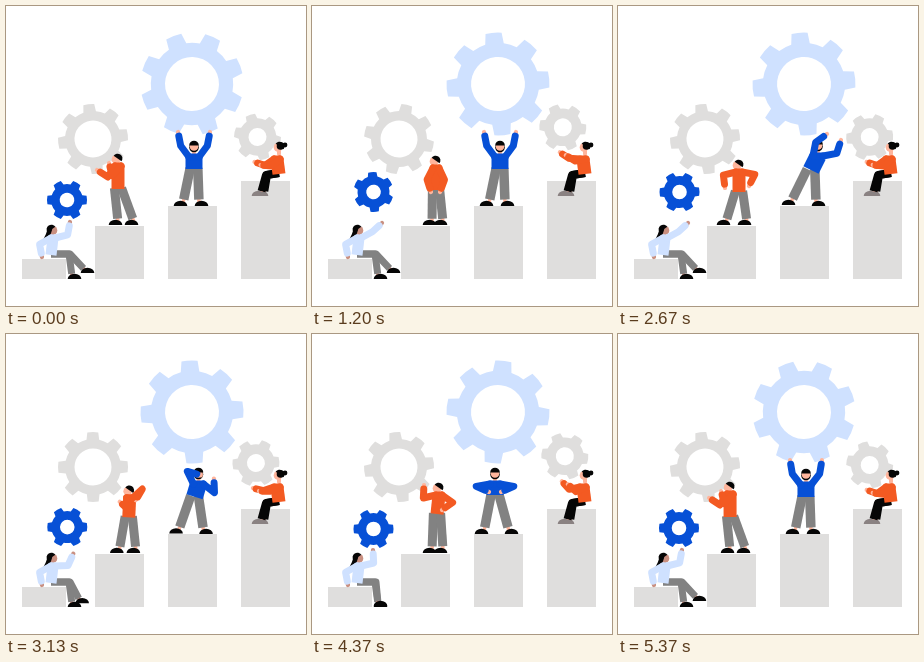
These frames come from a looping animation (300 px wide and 300 px high, 5.41 s). An HTML page with a canvas:

```html
<!DOCTYPE html>
<html lang="en">
<head>
<meta charset="utf-8">
<title>Gears</title>
<style>
  html, body { margin: 0; width: 100%; height: 100%; overflow: hidden; background: #fff; }
  canvas { display: block; width: 300px; height: 300px; }
</style>
</head>
<body>
<canvas id="stage"></canvas>
<script>
const canvas = document.getElementById('stage');
const ctx = canvas.getContext('2d');
const ratio = Math.max(1, window.devicePixelRatio || 1);
canvas.width = canvas.height = 300 * ratio;

const LOOP = 5410;
const KEYS = [0, 1200, 1970, 2670, 3600, 4370, LOOP];
const TAU = Math.PI * 2;
const GREY = '#dfdedd', PALE = '#cfe1ff', BLUE = '#0750d6', ORANGE = '#f35a22';
const TROUSER = '#828282', BLACK = '#060606', SKIN = '#ffb59c', TAN = '#c98f80';

const mix = (a, b, u) => a + (b - a) * u;
const between = (a, b, u) => a.map((v, k) => mix(v, b[k], u));

// Finds the current key interval and the eased progress through it.
function moment(time) {
  let i = 0;
  while (time >= KEYS[i + 1]) i++;
  const u = (time - KEYS[i]) / (KEYS[i + 1] - KEYS[i]);
  return { i, u: u * u * (3 - 2 * u) };
}

function angleAt(angles, time) {
  const { i, u } = moment(time);
  return mix(angles[i], angles[i + 1], u);
}

function poseAt(plan, time) {
  const { i, u } = moment(time);
  const a = plan[i], b = plan[(i + 1) % plan.length];
  return Object.fromEntries(Object.keys(a).map(k => [k, between(a[k], b[k], u)]));
}

// The seated juggler moves her gear around a small oval, twice per loop.
function juggled(time) {
  const a = 2 * TAU * time / LOOP;
  return [251.5 - 2 * Math.sin(a), 126 + 5 * Math.cos(a)];
}

const toss = {
  hold: { handA: [36, 251], handB: [64, 216], footB: [79, 264], gear: [61, 194] },
  reach: { handA: [36, 251], handB: [70, 217], footB: [79, 264], gear: [61.5, 186] },
  low: { handA: [36, 251], handB: [64, 223], footB: [67, 269], gear: [61, 202] },
  lift: { handA: [36, 251], handB: [61, 216], footB: [66, 269], gear: [61.5, 195] }
};
const push = { neck: [112, 160], hip: [112, 183], handA: [91, 164], handB: [103, 157], footA: [112, 216], footB: [128, 216] };
const stand = { ...push, neck: [124, 162], hip: [124, 184], handA: [119, 186], handB: [128, 186], footA: [120, 216], footB: [131, 216] };
const walk = { ...push, neck: [121, 166], hip: [121, 186], handA: [107, 182], handB: [131, 180], footA: [108, 216], footB: [129, 216] };
const think = { ...stand, neck: [127, 161], hip: [125, 180], handA: [122, 150], handB: [128, 149] };
const lean = { ...think, handA: [112, 151], handB: [130, 176] };

const raise = { neck: [188, 151], hip: [188, 163], handA: [172, 126], handB: [204, 126], footA: [177, 197], footB: [193, 197] };
const grab = { ...raise, neck: [200, 150], hip: [193, 164], handA: [209, 128], handB: [223, 134], footA: [173, 196], footB: [198, 197] };
const rest = { ...raise, neck: [183, 150], hip: [183, 161], handA: [177, 158], handB: [189, 158], footA: [172, 197], footB: [197, 197] };

const people = [
  {
    shirt: PALE, legs: TROUSER, skin: TAN, face: 1, toes: [1, 1], torso: 11, leg: 7, hair: 'tail',
    nape: [-1, -8], arm: 13, bend: [1, 0.6],
    fixed: { neck: [47, 232], hip: [45, 249], kneeA: [63, 248], kneeB: [64, 248], footA: [66, 270] },
    plan: [toss.hold, toss.reach, toss.reach, toss.reach, toss.low, toss.lift]
  },
  {
    shirt: ORANGE, legs: TROUSER, face: -1, toes: [-1, -1], torso: 13, leg: 9, hair: 'short',
    nape: [-1, -7], arm: 13, bend: [1, 0.6],
    plan: [push, stand, stand, walk, think, lean]
  },
  {
    shirt: BLUE, legs: TROUSER, face: 0, toes: [-1, 1], torso: 17, leg: 9.5, hair: 'beard',
    nape: [0, -11], arm: 14, bend: [1, 0.2],
    plan: [raise, raise, raise, grab, rest, rest]
  },
  {
    shirt: ORANGE, legs: BLACK, shoe: '#8a8282', face: -1, toes: [-1, -1], torso: 13, leg: 8, hair: 'bun',
    nape: [2, -12], arm: 11, bend: [0, 1],
    fixed: { neck: [271, 153], hip: [273, 168], kneeA: [261, 169], kneeB: [260, 169], footA: [258, 187], footB: [255, 187] },
    hands: time => {
      const [x, y] = juggled(time);
      return { handA: [x - 3, y + 25], handB: [x + 3, y + 28] };
    }
  }
];

const gears = [
  { at: () => [186, 78], teeth: 8, r: 51.5, hole: 27, color: PALE,
    angle: t => angleAt([24, -5, -20, -5, 0, 6, 24], t) },
  { at: () => [87, 133], teeth: 8, r: 35, hole: 18.5, color: GREY,
    angle: t => angleAt([-7, 13, 26, 38, 53, 83, 83], t) },
  { at: t => poseAt(people[0].plan, t).gear, teeth: 6, r: 20, hole: 7.3, color: BLUE,
    angle: t => 30 + 60 * Math.min(1, 2 * t / LOOP) },
  { at: juggled, teeth: 6, r: 23.5, hole: 9, color: GREY,
    angle: t => 34 + 8 * Math.cos(TAU * t / LOOP) }
];

function strokePath(width, color, cap) {
  ctx.lineWidth = width;
  ctx.lineCap = cap;
  ctx.lineJoin = 'round';
  ctx.strokeStyle = color;
  ctx.stroke();
}

function line(points, width, color, cap = 'round') {
  ctx.beginPath();
  points.forEach(p => ctx.lineTo(...p));
  strokePath(width, color, cap);
}

function dot([x, y], r, color, from = 0, to = TAU) {
  ctx.beginPath();
  ctx.arc(x, y, r, from, to);
  ctx.fillStyle = color;
  ctx.fill();
}

function drawGear(gear, time) {
  const { teeth, r, hole } = gear;
  const pitch = TAU / teeth, tip = pitch * 0.2, base = pitch * 0.29, root = r * 0.8;
  ctx.save();
  ctx.translate(...gear.at(time));
  ctx.rotate((gear.angle(time) - 90) * Math.PI / 180);
  ctx.beginPath();
  for (let i = 0; i < teeth; i++) {
    const mid = i * pitch;
    ctx.arc(0, 0, root, mid - pitch + base, mid - base);
    ctx.arc(0, 0, r, mid - tip, mid + tip);
  }
  ctx.closePath();
  ctx.moveTo(hole, 0);
  ctx.arc(0, 0, hole, 0, TAU);
  ctx.fillStyle = gear.color;
  ctx.fill('evenodd');
  ctx.restore();
}

function drawShoe([x, y], toe, color = BLACK) {
  ctx.beginPath();
  ctx.ellipse(x + toe * 2.5, y + 3, 6.8, 5.2, 0, Math.PI, TAU);
  ctx.fillStyle = color;
  ctx.fill();
}

function drawLeg(hip, knee, foot, toe, person) {
  const ankle = between(knee || hip, foot, 0.9);
  line([ankle, foot], 3.5, person.skin || SKIN);
  line(knee ? [hip, knee, ankle] : [hip, ankle], person.leg, person.legs, 'butt');
  drawShoe(foot, toe, person.shoe);
}

// Places the elbow on the side of the arm that lies towards the bend vector.
function elbowOf(shoulder, hand, length, bend) {
  const dx = hand[0] - shoulder[0], dy = hand[1] - shoulder[1];
  const d = Math.hypot(dx, dy) || 1;
  const off = Math.sqrt(Math.max(0, length * length - d * d / 4));
  const side = -dy * bend[0] + dx * bend[1] < 0 ? -1 : 1;
  const mid = between(shoulder, hand, 0.5);
  return [mid[0] - side * off * dy / d, mid[1] + side * off * dx / d];
}

function drawArm(shoulder, hand, bend, person) {
  const elbow = elbowOf(shoulder, hand, person.arm, bend);
  const cuff = between(elbow, hand, 0.7);
  line([cuff, hand], 4.2, person.skin || SKIN);
  ctx.beginPath();
  ctx.moveTo(...shoulder);
  ctx.quadraticCurveTo(...between(shoulder, elbow, 0.6), ...elbow);
  ctx.lineTo(...cuff);
  strokePath(7, person.shirt, 'round');
}

function drawHead([x, y], { face, hair, skin = SKIN }) {
  line([[x, y + 2], [x, y + 7]], 4, skin);
  if (hair === 'beard') dot([x, y + 1.5], 4.8, BLACK);
  dot([x + face, y + 0.4], 4.3, skin);
  const tilt = -face * 0.6;
  dot([x - face * 0.6, y - 0.5], 4.8, BLACK, Math.PI + tilt, TAU + tilt);
  if (hair === 'tail') line([[x - 2, y - 1], [x - 4, y + 5], [x - 7, y + 11]], 4.5, BLACK);
  if (hair === 'bun') {
    dot([x + 1.5, y - 1], 3.8, BLACK);
    dot([x + 6, y - 2], 2.4, BLACK);
  }
}

function drawPerson(person, time) {
  const j = {
    ...person.fixed,
    ...(person.hands ? person.hands(time) : poseAt(person.plan, time))
  };
  const half = person.torso / 2 - 3.5;
  const left = [j.neck[0] - half, j.neck[1]];
  const right = [j.neck[0] + half, j.neck[1]];
  const side = j.kneeA ? 0 : person.leg * 0.4;
  const [bx, by] = person.bend;

  drawLeg([j.hip[0] - side, j.hip[1] - 1], j.kneeA, j.footA, person.toes[0], person);
  drawLeg([j.hip[0] + side, j.hip[1] - 1], j.kneeB, j.footB, person.toes[1], person);
  drawHead([j.neck[0] + person.nape[0], j.neck[1] + person.nape[1]], person);
  line([j.neck, j.hip], person.torso, person.shirt, 'butt');
  line([left, right], 7, person.shirt);
  drawArm(left, j.handA, [-bx, by], person);
  drawArm(right, j.handB, [bx, by], person);
}

function draw(now) {
  // The motion advances in thirty steps per second.
  const time = Math.floor((now % LOOP) * 0.03) / 0.03;
  ctx.setTransform(ratio, 0, 0, ratio, 0, 0);
  ctx.fillStyle = '#fff';
  ctx.fillRect(0, 0, 300, 300);
  ctx.fillStyle = GREY;
  // Bars: left edge and top.
  [[16, 253], [89, 220], [162, 200], [235, 175]]
    .forEach(([x, y], i) => ctx.fillRect(x, y, i ? 49 : 44, 273 - y));
  gears.forEach(g => drawGear(g, time));
  people.forEach(p => drawPerson(p, time));
}

const begin = performance.now();
function tick() {
  draw(performance.now() - begin);
  requestAnimationFrame(tick);
}
tick();
</script>
</body>
</html>
```
